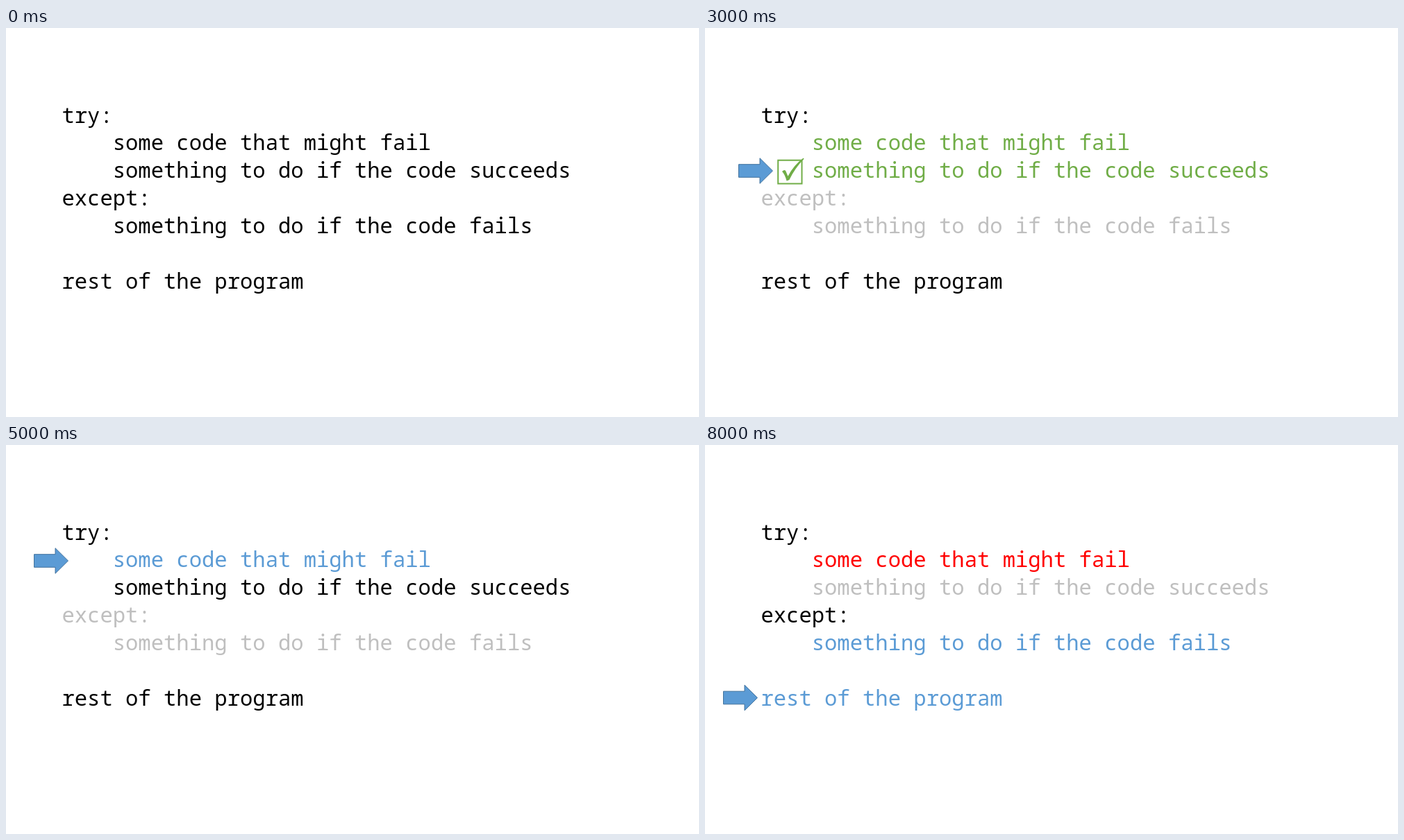
An HTML page for the animation above (9 s loop, 998x561 px).

```html
<!DOCTYPE html>
<html lang="en">
<head>
<meta charset="utf-8">
<style>
  html, body { margin: 0; width: 100%; height: 100%; overflow: hidden; background: #fff; }
  svg { display: block; width: 998px; height: 561px; }
  text { font: 30.55px "Noto Sans Mono", "DejaVu Sans Mono", monospace; white-space: pre; }
</style>
</head>
<body>
<svg viewBox="0 0 998 561">
  <g id="code"></g>
  <g id="check">
    <rect x="1.2" y="1.2" width="34.3" height="33.8" fill="none" stroke="#70ad47" stroke-width="2"/>
    <path d="M7 17.5Q10.5 14 12.4 17L15.4 24.2Q24 8 37.6 -2L38.6 -0.8Q25 13 17.4 29.6L13.6 31Q10.8 21 7 17.5Z" fill="#70ad47"/>
  </g>
  <g id="cross" fill="none" stroke="#f00">
    <rect x="1.7" y="1.7" width="32.8" height="32.6" stroke-width="3.2"/>
    <path d="M7 7L29.2 29.2M29.2 7L7 29.2" stroke-width="2.8"/>
  </g>
  <path id="arrow" d="M.5 9.7H31V.7L49.5 19L31 37.3V28.3H.5Z" fill="#5b9bd5" stroke="#41719c"/>
</svg>
<script>
const lines = [
  "try:",
  "    some code that might fail",
  "    something to do if the code succeeds",
  "except:",
  "    something to do if the code fails",
  "",
  "rest of the program"
];
const inks = { k: "#000", b: "#5b9bd5", g: "#70ad47", r: "#f00", s: "#bfbfbf" };

// One ink letter per line, then the places of the marks that show.
const steps = [
  { ink: "kkkkkkk" },
  { ink: "kbksskk", arrow: [40, 148] },
  { ink: "kgbsskk", arrow: [48, 187], check: [54, 146.5] },
  { ink: "kggsskk", arrow: [48, 187], check: [104, 189.5] },
  { ink: "kggsskb", arrow: [35, 351] },
  { ink: "kbksskk", arrow: [40, 148] },
  { ink: "krskkkk", arrow: [40, 148], cross: [104, 148] },
  { ink: "krskbkk", arrow: [48, 266] },
  { ink: "krskbkb", arrow: [26, 345.5] }
];

const byId = id => document.getElementById(id);
const rows = lines.map((line, i) => {
  const row = document.createElementNS("http://www.w3.org/2000/svg", "text");
  row.textContent = line;
  row.setAttribute("x", 80.4);
  row.setAttribute("y", 136.5 + 39.9 * i);
  return byId("code").appendChild(row);
});

function show(step) {
  rows.forEach((row, i) => row.setAttribute("fill", inks[step.ink[i]]));
  for (const id of ["arrow", "check", "cross"]) {
    const mark = byId(id), place = step[id];
    mark.setAttribute("visibility", place ? "visible" : "hidden");
    if (place) mark.setAttribute("transform", `translate(${place})`);
  }
}

const start = performance.now();
let shown;
function tick() {
  const step = steps[Math.floor((performance.now() - start) / 1000) % steps.length];
  if (step !== shown) show(shown = step);
  requestAnimationFrame(tick);
}
tick();
</script>
</body>
</html>
```
